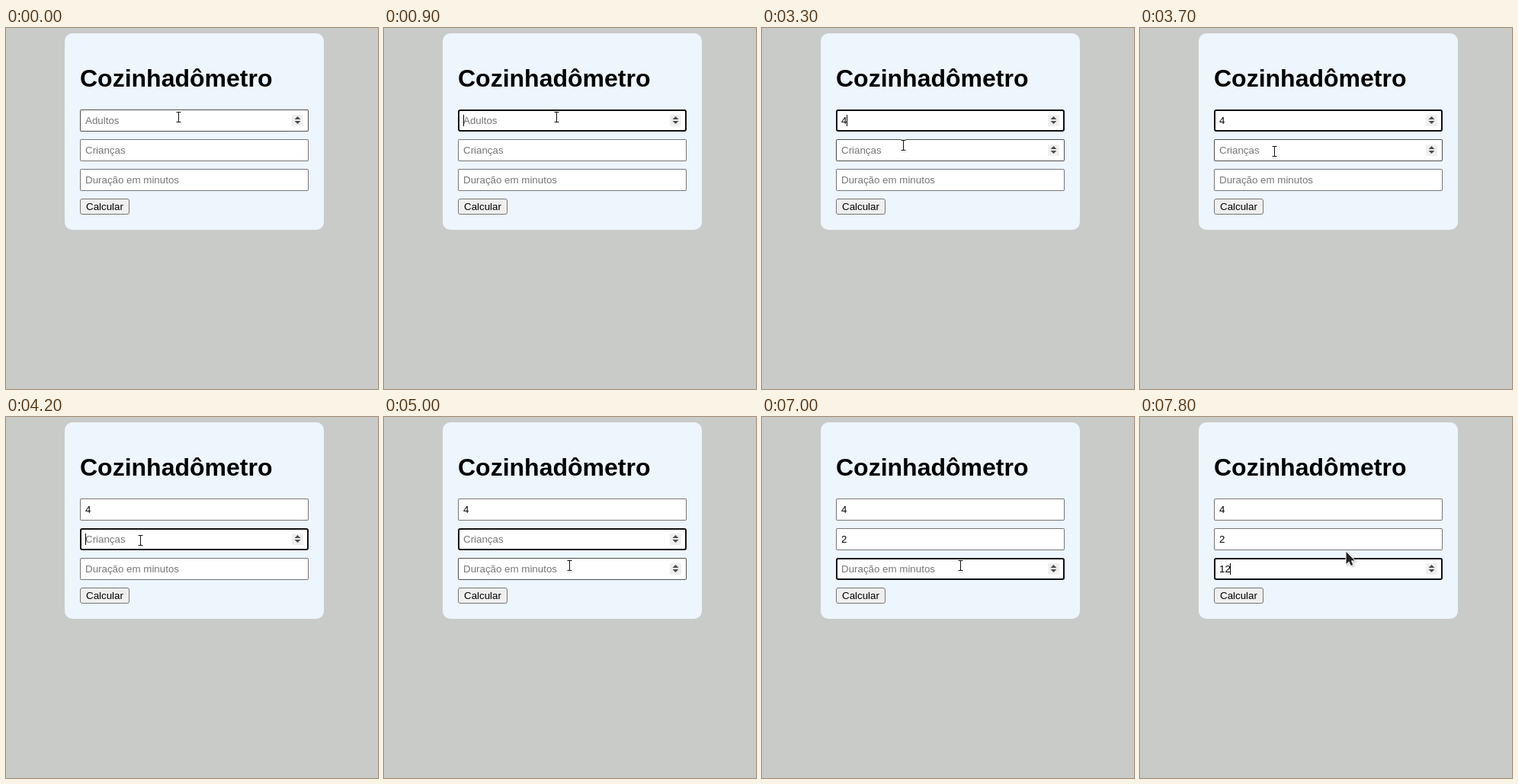
Recreate the animation shown at these times as an HTML page. Size 488x474 px, loop 8 s.

```html
<!DOCTYPE html>
<html lang="pt-BR">
<head>
<meta charset="utf-8">
<title>Cozinhadômetro</title>
<style>
html, body { margin: 0; width: 100%; height: 100%; overflow: hidden; background: #c9cbc9; }
body { position: relative; font: 13.3333px/15px "Liberation Sans", Arial, sans-serif; color: #000; }
div, h1, span, svg, i { position: absolute; box-sizing: border-box; white-space: nowrap; }
.card { left: 77px; top: 7px; width: 340px; height: 258px; border-radius: 10px; background: #edf5fd; }
h1 { left: 20px; top: 41px; margin: 0; font-size: 32px; line-height: 37px; font-weight: bold; }
.field { left: 20px; width: 300px; height: 29px; border-radius: 2px; background: #fff; box-shadow: inset 0 0 0 1px #767676; }
.field span { left: 7px; top: 7px; }
.field.empty span { color: #757575; }
.field.hover { box-shadow: inset 0 0 0 1px #4f4f4f; }
.field.focus { border-radius: 3px; box-shadow: inset 0 0 0 2px #101010; }
.field i { top: 7px; width: 1px; height: 15px; background: #000; visibility: hidden; }
.spin { left: 278px; top: 7px; visibility: hidden; }
.hover .spin, .focus .spin { visibility: visible; }
.button { left: 20px; top: 217px; width: 65px; height: 21px; padding: 2px 7px; border: 1px solid #767676; border-radius: 3px; background: #efefef; }
#pointer { left: 0; top: 0; overflow: visible; }
#arrow { paint-order: stroke; filter: drop-shadow(1px 1px 1px #0004); }
</style>
</head>
<body>
<div class="card">
  <h1>Cozinhadômetro</h1>
  <div class="button">Calcular</div>
</div>
<svg id="pointer" width="20" height="20">
  <g id="beam" fill="none">
    <path d="M-3 -6.5H3M0 -6V6M-3 6.5H3" stroke="#fff" stroke-width="3" opacity=".8"/>
    <path d="M-3 8.5H4" stroke="#000" opacity=".15"/>
    <path d="M-3 -6.5H3M0 -6V6M-3 6.5H3" stroke="#111"/>
  </g>
  <path id="arrow" d="M0 0V16L3.7 12.6L6.2 18L8.8 16.9L6.4 11.5H11.2Z" fill="#222" stroke="#fff" stroke-width="2"/>
</svg>
<script>
const LOOP = 8000, STEP = 100;
const BLINK = 1600, LIT = 500;
const GLYPH = 7.41, DECEL = 4.2;
const card = document.querySelector('.card');
const [pointer, beam, arrow] = ['pointer', 'beam', 'arrow'].map(id => document.getElementById(id));

// keys: when each character of text is typed
const fields = [
  { label: 'Adultos', focus: 900, text: '4', keys: [3200] },
  { label: 'Crianças', focus: 4200, text: '2', keys: [5300] },
  { label: 'Duração em minutos', focus: 6200, text: '12', keys: [7400, 7800] }
];
const home = { x: 226, y: 117 };
const moves = [
  { from: 3200, to: 3500, x: 176, y: 162 },
  { from: 4700, to: 5500, x: 254, y: 200 },
  { from: 6500, to: 6700, x: 260, y: 195 },
  { from: 7000, to: 7400, x: 270, y: 177 }
];

fields.forEach((f, n) => {
  f.top = 107 + 39 * n;
  f.box = document.createElement('div');
  f.box.style.top = f.top - 7 + 'px';
  f.box.innerHTML = `<span></span><i></i>
    <svg class="spin" width="15" height="15"><path d="M0 0H15V15H0Z" fill="#efefef"/>
    <path d="M3.5 6L7.5 2L11.5 6ZM3.5 8L7.5 12L11.5 8Z" fill="#4d4d4d"/></svg>`;
  f.span = f.box.querySelector('span');
  f.caret = f.box.querySelector('i');
  card.append(f.box);
});

// Every move starts quickly and slows into its end point.
function pointerAt(t) {
  let { x, y } = home;
  for (const m of moves) {
    const p = Math.min(1, Math.max(0, (t - m.from) / (m.to - m.from)));
    const k = 1 - (1 - p) ** DECEL;
    x += (m.x - x) * k;
    y += (m.y - y) * k;
  }
  return [Math.round(x), Math.round(y)];
}

function render(time) {
  const t = Math.floor(time / STEP) * STEP;
  const [x, y] = pointerAt(t);
  const active = fields.filter(f => f.focus <= t).pop();
  let overField = false;

  for (const f of fields) {
    const typed = f.keys.filter(k => k <= t);
    const value = f.text.slice(0, typed.length);
    const hover = y >= f.top && y < f.top + 29;
    const sinceInput = t - Math.max(f.focus, ...typed);
    const lit = f === active && sinceInput % BLINK < LIT;
    overField ||= hover;
    f.box.className = 'field';
    f.box.classList.toggle('empty', !value);
    f.box.classList.toggle('hover', hover);
    f.box.classList.toggle('focus', f === active);
    f.span.textContent = value || f.label;
    f.caret.style.left = 7 + Math.floor(value.length * GLYPH) + 'px';
    f.caret.style.visibility = lit ? 'visible' : 'hidden';
  }

  beam.style.display = overField ? '' : 'none';
  arrow.style.display = overField ? 'none' : '';
  pointer.style.transform = `translate(${x + .5}px, ${y}px)`;
}

const start = performance.now();
function tick() {
  render((performance.now() - start) % LOOP);
  requestAnimationFrame(tick);
}
tick();
</script>
</body>
</html>
```
